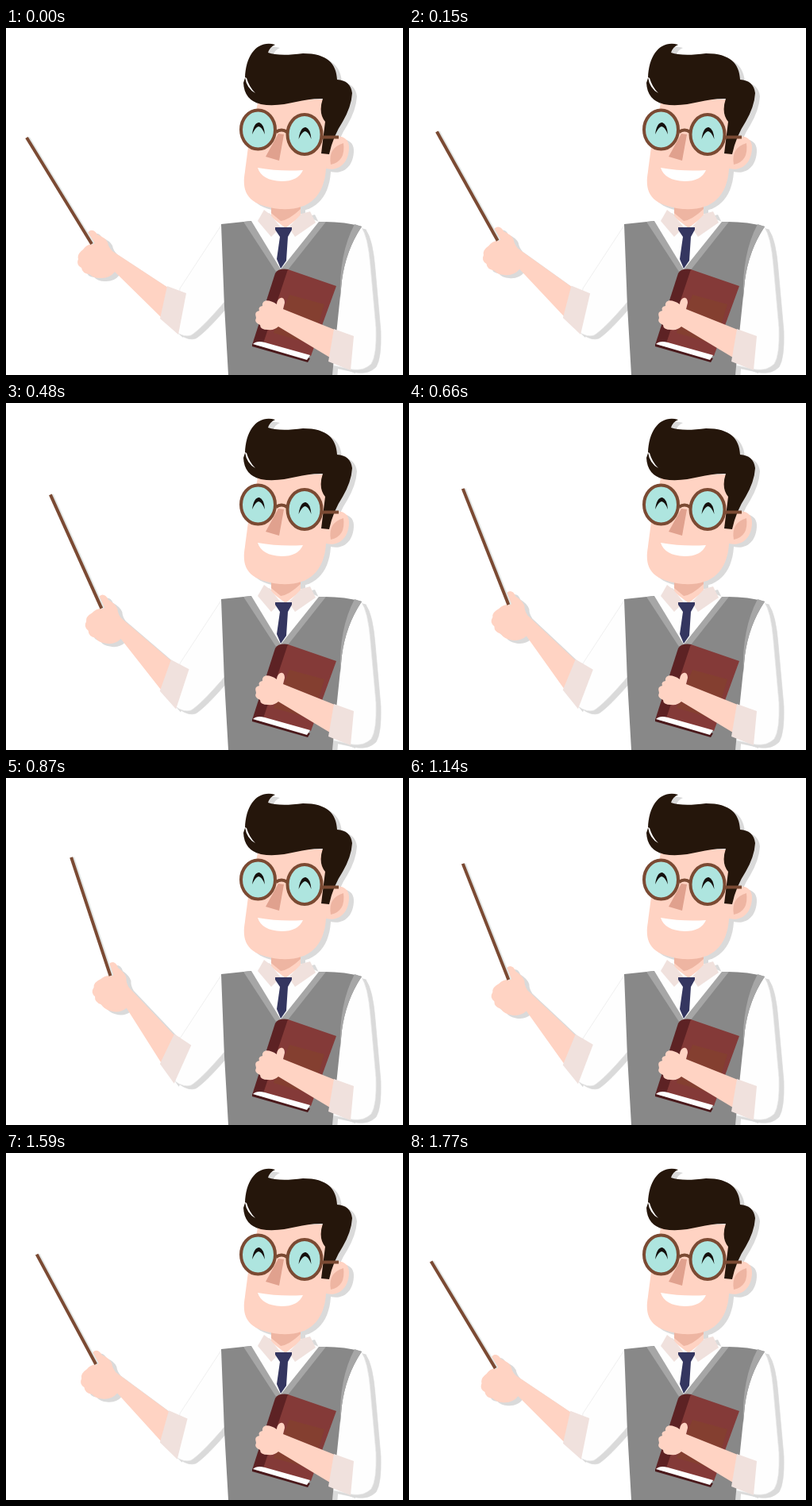
These frames come from a looping animation (500 px wide and 437 px high, 1.8 s). An HTML page:

```html
<!DOCTYPE html>
<html lang="en">
<head>
<meta charset="utf-8">
<title>Teacher with pointer</title>
<style>
html, body { margin: 0; width: 100%; height: 100%; overflow: hidden; background: #fff; }
svg { display: block; width: 500px; height: 437px; }
.shadow { filter: drop-shadow(6px 4px 0 #dadada); }
.thin { filter: drop-shadow(2px 0 0 #e2e6e4); }
.skin { fill: #ffd3c3; }
.shade { fill: #eeb5a2; }
.shirt { fill: #fefefe; }
.sleeve { fill: #fefefe; stroke: #e8e8e8; stroke-width: .7; }
.cuff { fill: #f0e1dd; }
.hair { fill: #25160b; }
.tie { fill: #343660; }
.band { fill: #a6a6a6; }
.wood { fill: none; stroke: #7b4a33; stroke-width: 4; }
.lens { fill: #aee5df; stroke: #7b4a33; stroke-width: 4; }
</style>
</head>
<body>
<svg viewBox="0 0 500 437">
  <g class="shadow">
    <!-- sleeves -->
    <path class="sleeve" d="M272 247L219 328L213 382Q224 390 233 387Q246 379 275 345Z"/>
    <path class="sleeve" d="M447 250Q456 262 459 300L466 378Q467 412 460 423Q451 432 436 430L408 424L420 300Z"/>

    <!-- pointing arm -->
    <g class="swing">
      <path class="skin" d="M103 266C100 254 110 251 115 260Q125 264 128 270Q129 276 134 281L204 327L195 364L137 307Q130 316 118 315Q110 315 105 310Q96 309 95 302Q88 298 91 291Q89 285 97 279Q101 273 108 272Z"/>
      <path class="cuff" d="M203 325L227 334L217 386L194 366Z"/>
    </g>

    <!-- torso -->
    <path fill="#888" d="M271 247L309 243L393 244Q425 243 448 250Q428 280 423 318L416 385L411 437H280L275 350Z"/>
    <path class="band" d="M448 250Q428 280 423 318L421 340Q419 285 439 247Z"/>
    <path class="band" d="M299 244L310 243L346 302L392 244L403 244L346 316Z"/>
    <path class="shirt" d="M309 243L346 304L394 244L371 234L333 236Z"/>
    <path class="skin" d="M334 218H371V237L352 252L334 238Z"/>
    <path class="shade" d="M334 226Q352 230 371 223V228Q356 242 346 243L334 233Z"/>
    <path class="cuff" d="M325 229L333 235L346 251L334 263L317 243Z"/>
    <path class="cuff" d="M372 234L383 231L390 245L364 263L356 251Z"/>
    <path class="tie" d="M339 251H360V254L355 263L353 293L346 303L341 291L345 263L339 254Z"/>

    <!-- head -->
    <path class="skin" d="M402 145C412 132 432 134 432 150C432 169 420 181 403 177Z"/>
    <path class="shade" d="M409 172Q405 151 425 145Q428 168 409 172Z"/>
    <path class="skin" d="M318 90L305 150L300 188C298 211 309 224 345 228C380 230 400 214 403 178L404 90Z"/>
    <path class="hair" d="M339 21C318 15 302 32 301 63L299 69Q300 91 321 96C350 101 372 88 399 89Q393 107 402 118L397 158L407 159Q412 136 424 118Q435 99 436 82Q434 66 417 65C416 45 405 32 374 32Q344 36 330 31Q332 24 339 21Z"/>
    <path fill="#fff" d="M301 62Q303 76 314 82Q306 74 303 63Z"/>
    <path fill="#e0a18e" d="M343 133L327 162L344 167L350 134Z"/>
    <ellipse class="lens" cx="317.500" cy="128" rx="21.500" ry="24.500"/>
    <ellipse class="lens" cx="376" cy="134" rx="21.500" ry="25"/>
    <path class="wood" d="M340 131Q347 126 354 131M398 137.500H419"/>
    <path id="eye" fill="#15100d" d="M310 134Q312 119 319 119Q325 121 326 134Q322 124 318 124Q314 125 310 134Z"/>
    <use href="#eye" x="58.500" y="6"/>
    <path fill="#fff" d="M317 176Q345 181 374 179Q368 193 347 193Q322 192 317 176Z"/>

    <!-- book -->
    <path fill="#5d2224" d="M339 309Q343 302 356 304L326 398L310 399Z"/>
    <path fill="#843a38" d="M355 304L416 325L384 413L324 397Z"/>
    <path fill="#843f30" d="M357 336L401 348L386 398L337 384Z"/>
    <path fill="#4a191b" d="M310 398L383 416L380 421L310 401Z"/>
    <path fill="#fff" d="M311 398Q316 393 326 396L383 412L379 418Z"/>

    <!-- holding arm -->
    <path class="skin" d="M323 350C322 342 331 341 341 348C342 338 351 337 351 346L349 354L414 380L408 415L343 376Q338 381 330 380Q320 380 320 374Q312 371 315 365Q312 357 319 356Q317 351 323 350Z"/>
    <path class="cuff" d="M413 379L438 388L434 431L406 420Z"/>
  </g>
  <g class="thin"><path class="swing wood" d="M26 138L108 272"/></g>
</svg>
<script>
const parts = document.querySelectorAll('.swing');
const LOOP = 1800, STEP = 30, SWING = 13.6;

function draw() {
  const t = Math.floor(performance.now() % LOOP / STEP) * STEP;
  const raised = 1 - Math.abs(t / (LOOP / 2) - 1);
  for (const part of parts) {
    part.setAttribute('transform', `rotate(${SWING * raised} 219.500 362.500)`);
  }
  requestAnimationFrame(draw);
}
draw();
</script>
</body>
</html>
```
